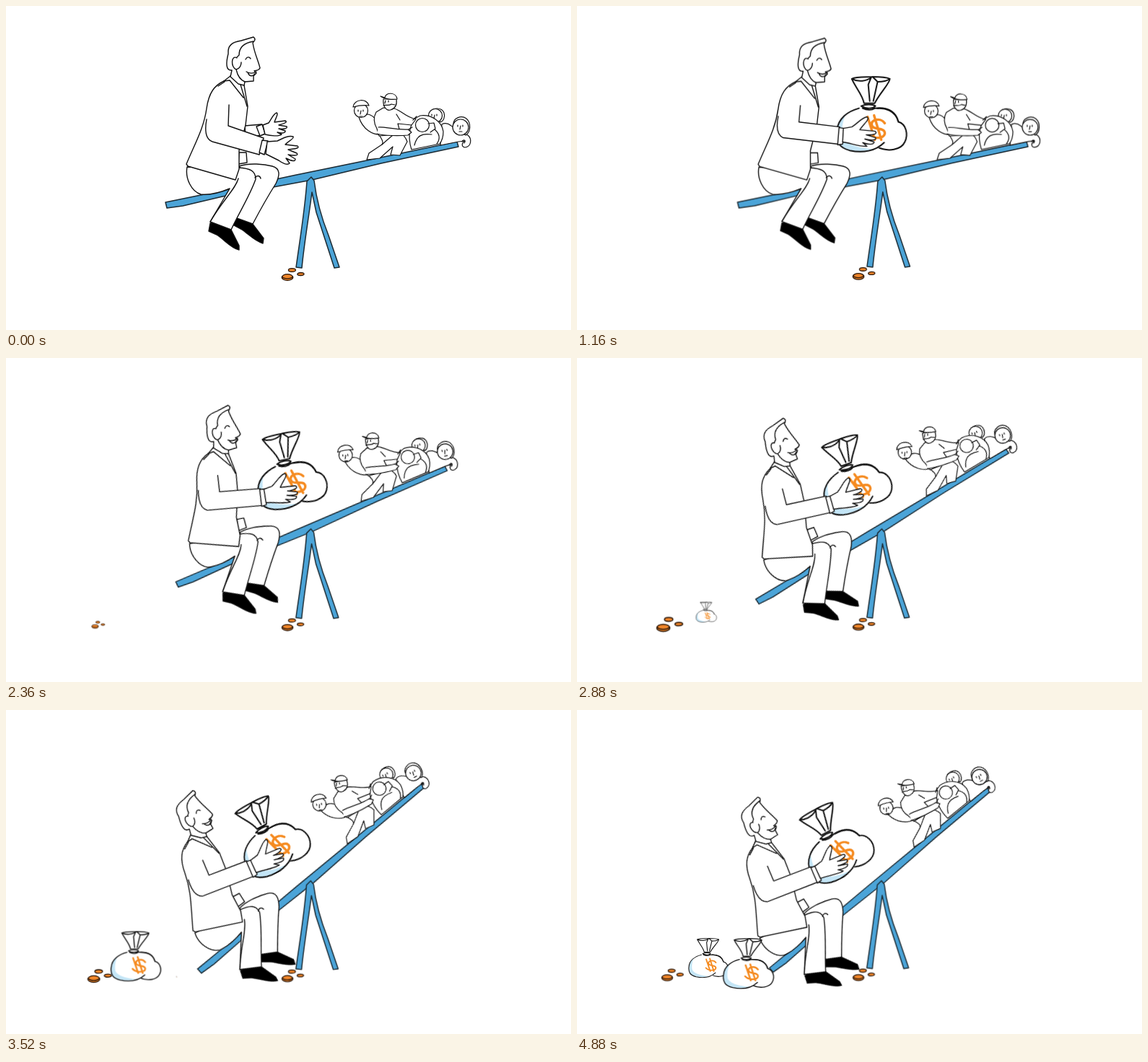
An HTML page without scripts that plays this animation: 783 by 449 pixels, repeating every 4.92 s.

```html
<!DOCTYPE html>
<html lang="en">
<head>
<meta charset="utf-8">
<title>Seesaw</title>
<style>
@property --lean { syntax: '<angle>'; inherits: true; initial-value: 0deg; }

:root { --loop: 4920ms linear infinite; }
html, body { margin: 0; width: 100%; height: 100%; overflow: hidden; background: #fff; }
svg { display: block; width: 100%; height: 100%; animation: lean var(--loop); }

.ink { fill: none; stroke: #111; stroke-width: 1.4; stroke-linecap: round; stroke-linejoin: round; }
.thin { stroke-width: 1.2; }
.bold { stroke-width: 2; }
.paper { fill: #fff; }
.black { fill: #000; }
.blue { fill: #4ba4d8; stroke: #1b2a33; stroke-width: 1.5; }
.coin { fill: #f0862a; stroke: #2a1608; stroke-width: 1.3; }
.shade { fill: #c3e5f6; stroke: none; }
.bare { stroke: none; }
.money { fill: none; stroke: #f58a1f; stroke-width: 3.4; }

.camera { transform-origin: 391.5px 224.5px; animation: camera var(--loop); }
.seesaw { transform-origin: 423px 234px; transform: rotate(calc(var(--lean) * -1)); }
.level { transform-box: fill-box; transform-origin: center; transform: rotate(calc(var(--lean) * .65)); }
.man { animation: man-slide var(--loop); }
.crew { animation: crew-slide var(--loop); }
.open { animation: open var(--loop); }
.hold { animation: hold var(--loop); }
.held { transform-origin: 400px 178px; animation: held var(--loop); }
.pop-coins { animation: pop-coins var(--loop); }
.pop-first { animation: pop-first var(--loop); }
.pop-second { animation: pop-second var(--loop); }

@keyframes camera { to { transform: scale(.9657); } }
@keyframes lean {
  0% { --lean: 0deg; }
  24.2% { --lean: .1deg; animation-timing-function: cubic-bezier(.4, 0, .75, .55); }
  34.6% { --lean: 2.8deg; }
  36.6% { --lean: 4.1deg; }
  45.9% { --lean: 10deg; }
  58.5% { --lean: 19.2deg; }
  67.1% { --lean: 25.8deg; animation-timing-function: ease-out; }
  71.5%, 100% { --lean: 27.9deg; }
}
@keyframes man-slide {
  0%, 46% { transform: none; }
  58.5% { transform: translate(-1px, .2px); }
  71.5% { transform: translate(-9.3px, 2px); }
  84.6% { transform: translate(-16.6px, 3.5px); }
  100% { transform: translate(-22.5px, 4.7px); }
}
@keyframes crew-slide {
  0%, 46% { transform: none; }
  58.5% { transform: translate(-3px, .6px); }
  71.5% { transform: translate(-7.8px, 1.6px); }
  84.6% { transform: translate(-11.2px, 2.4px); }
  100% { transform: translate(-14.7px, 3.1px); }
}
@keyframes open { 0%, 9.7% { opacity: 1; } 9.71%, 100% { opacity: 0; } }
@keyframes hold { 0%, 9.7% { opacity: 0; } 9.71%, 100% { opacity: 1; } }
@keyframes held { 0%, 6% { transform: scale(0); } 13%, 100% { transform: none; } }
@keyframes pop-coins {
  0%, 39% { transform: scale(0); }
  46.7% { transform: scale(.51); }
  52.4% { transform: scale(.9); }
  59.8% { transform: scale(1.25); }
  63.4% { transform: scale(1.3); }
  67.1% { transform: scale(1.22); }
  72.8% { transform: scale(1.05); }
  79.7%, 100% { transform: none; }
}
@keyframes pop-first {
  0%, 50.8% { transform: scale(0); }
  58.5% { transform: scale(.51); }
  64.2% { transform: scale(.9); }
  71.5% { transform: scale(1.25); }
  75.2% { transform: scale(1.32); }
  78.9% { transform: scale(1.25); }
  84.6% { transform: scale(1.05); }
  91.5%, 100% { transform: none; }
}
@keyframes pop-second {
  0%, 70.9% { transform: scale(0); }
  78.7% { transform: scale(.51); }
  84.4% { transform: scale(.9); }
  91.7% { transform: scale(1.25); }
  95.3% { transform: scale(1.32); }
  100% { transform: scale(1.27); }
}
</style>
</head>
<body>
<svg viewBox="0 0 783 449" preserveAspectRatio="none">
  <defs>
    <g id="coins" class="coin">
      <ellipse cx="-8.4" cy="4.2" rx="7.8" ry="4.3"/>
      <path d="M-16 3C-13 7-4 7-.8 3" fill="none"/>
      <ellipse cx="-2" cy="-5.8" rx="5" ry="2.3"/>
      <ellipse cx="10" cy="-.3" rx="4.6" ry="2"/>
    </g>
    <g id="bag" class="ink bold">
      <path class="paper" d="M412 142C428 139 442 145 446 160C457 163 460 178 455 188C450 199 432 203 416 195Z"/>
      <path class="paper bare" d="M397 141C378 144 362 154 360 173C357 190 366 198 390 202C408 203 424 196 430 186C442 166 440 146 412 141Z"/>
      <path class="shade" d="M372 150C360 158 357 182 364 193C374 201 394 203 410 198C392 197 372 192 368 180C366 168 369 158 372 150Z"/>
      <path d="M391 141C376 145 361 155 360 173C358 189 364 196 378 200C396 204 414 201 426 189M413 141C434 139 443 148 446 160"/>
      <path class="paper" d="M381 100C388 96 404 98 410 97C420 97 428 97 434 100C435 105 419 121 413 134L398 134C396 122 386 112 381 100Z"/>
      <path d="M381 100C390 105 402 103 408 98L404 108 406 131M411 98L417 104 411 131M417 104C424 104 430 103 434 100"/>
      <path class="paper" d="M394 138C400 135 410 135 414 138C410 142 400 142 394 138ZM396 141C402 144 409 144 413 141"/>
      <path class="money" d="M427 162C421 153 406 157 409 165C411 172 427 167 427 176C426 185 408 184 402 176M403 153L413 185M412 151L422 185"/>
    </g>
    <path id="face" d="M-4-2v2M3-2v2M0-1l-1 5M-2 7h4"/>
  </defs>

  <g class="camera">
    <g class="seesaw">
      <path class="ink blue" d="M221 272L309 254 400 234.500 500 214 625 188 627 195 520 218 424 241 300 264 245 277 223 280Z"/>

      <g class="crew ink thin">
        <!-- worker at the tip -->
        <path class="paper" d="M604 164C611 160 619 166 626 176L640 179C646 184 645 195 636 196C631 195 631 190 636 187L627 188 602 193Z"/>
        <path d="M632 188C634 184 638 186 635 190"/>
        <path class="paper" d="M620 165C619 155 631 151 638 156C645 162 644 175 637 179Z"/>
        <circle class="paper" cx="630" cy="168" r="11"/>
        <use href="#face" x="630" y="167"/>
        <!-- curled worker -->
        <path class="paper" d="M588 148C590 140 604 140 607 148C609 154 606 160 602 161Z"/>
        <circle class="paper" cx="595" cy="152" r="9.500"/>
        <use href="#face" x="594" y="152"/>
        <path class="paper" d="M562 199C556 180 559 157 574 152C590 150 604 160 606 174C606 182 604 187 601 191Z"/>
        <circle cx="577" cy="165" r="9.500"/>
        <path d="M566 193C569 180 576 176 590 178M585 163L593 162 595 170 588 175M594 171C601 177 602 184 597 191"/>
        <!-- worker hanging back -->
        <path class="paper" d="M500 150C508 150 513 157 519 167L522 178C508 180 494 170 489 154Z"/>
        <g class="level">
          <circle class="paper" cx="492" cy="145" r="9.500"/>
          <use href="#face" x="492" y="146"/>
          <path class="paper" d="M481 140C482 129 500 127 503 138C496 137 488 138 481 140Z"/>
        </g>
        <!-- bearded worker -->
        <path class="paper" d="M517 178C520 184 524 188 521 192L503 204 500 213 518 211 536 195 533 206 546 207 556 188C554 182 550 178 546 176Z"/>
        <path d="M521 192C526 188 532 182 535 180"/>
        <path class="paper" d="M523 141L513 147C508 156 510 163 514 170L517 180 547 178 543 163 562 165 568 157C554 154 548 145 538 142Z"/>
        <path class="paper" d="M516 168C525 167 540 172 557 171L562 175 557 179C545 180 525 180 514 177"/>
        <path d="M541 150L546 158M564 158L569 153M558 171L563 168"/>
        <g class="level">
          <path class="paper" d="M523 129C522 139 527 146 533 144C540 142 542 136 541 129Z"/>
          <path d="M523 138C526 136 530 139 534 136L539 137M530 131v2M526 131l-1 4"/>
          <path class="paper" d="M519 125L525 127C526 119 541 119 542 129C535 130 524 129 519 125Z"/>
        </g>
      </g>
    </g>

    <path class="ink blue" d="M417 243L423 237 427 242C431 275 439 298 447 318L462 362 455 363 430 286 424 258C420 290 413 330 410 363L402 362C407 325 414 285 417 243Z"/>

    <g class="seesaw">
      <g class="man ink">
        <!-- legs -->
        <path class="black" d="M318 293L341 301 357 322 356 329C345 326 336 316 327 310L314 303Z"/>
        <path class="paper" d="M323 222C337 217 358 219 369 222C380 225 380 234 374 246C362 265 352 283 342 302L317 293 335 240Z"/>
        <path class="black" d="M283 301L290 300 312 310 323 332 323 338C312 336 303 324 292 317L281 312Z"/>
        <path class="paper" d="M251 223C248 239 257 257 270 261C282 262 296 259 310 253L283 299 312 310C322 288 338 263 346 240C346 228 338 225 322 224Z"/>
        <path d="M322 239C318 254 301 268 283 299M345 238C348 234 352 235 353 239"/>
        <!-- far arm, empty hand -->
        <g class="open">
          <path class="paper" d="M331 166L354 164 357 178 332 184Z"/>
          <path class="paper" d="M347 167L355 164 359 177 352 180Z"/>
          <path class="paper" d="M356 165L364 162C368 156 371 149 375 148C378 149 373 157 372 161L387 159C391 161 385 163 378 165L389 167C391 170 384 171 378 170L387 173C388 176 382 177 376 175L382 178C378 181 367 180 359 178Z"/>
        </g>
        <!-- jacket -->
        <path class="paper" d="M323 203L333 203 334 217 322 219Z"/>
        <path class="paper" d="M311 97L302 104C289 110 281 120 278 142C274 170 262 190 250 219L252 222 318 241 323 226 323 200 332 165 335 139 330 110Z"/>
        <path d="M302 104L310 103 329 127M311 97L325 109 334 139M294 111L303 105"/>
        <!-- head -->
        <path class="paper" d="M311 98L313 89C304 90 305 78 308 66C307 55 313 50 326 48L343 43C347 46 344 49 342 51C344 65 349 74 352 86C350 90 346 89 344 90L347 93 343 97 343 104 331 105 330 110 322 108Z"/>
        <path d="M343 49C330 51 323 57 323 68L320 71M320 72C312 67 311 85 319 88C324 87 326 82 326 78M319 88C321 97 326 103 331 105M332 74C334 70 337 70 339 73M333 91C338 94 342 94 347 91M335 92C337 98 342 98 345 94"/>
        <!-- near arm, empty hand -->
        <g class="open">
          <path class="paper bare" d="M309 137L308 166 357 183 351 206 286 188C277 185 275 174 278 157Z"/>
          <path d="M309 137L308 166 357 183 351 206 286 188C277 185 275 174 278 157"/>
          <path class="paper" d="M355 186L363 187 358 206 351 203Z"/>
          <path class="paper" d="M362 188L376 187C384 183 392 179 398 181C400 184 391 187 387 192L404 194C408 197 400 198 391 199L403 204C406 207 400 208 391 206L401 212C401 216 396 215 388 211L393 218C390 221 383 218 378 214L360 205Z"/>
        </g>
        <use class="held" href="#bag"/>
        <!-- near arm around the sack -->
        <g class="hold">
          <path class="paper bare" d="M309 125L307 159 364 167 362 191 285 182C276 178 275 167 278 152Z"/>
          <path d="M309 137L307 160 364 167 362 191 285 182C276 178 275 167 278 152"/>
          <path class="paper" d="M363 168L370 169 368 191 361 192Z"/>
          <path class="paper" d="M369 169L381 167C389 162 395 154 402 153C407 156 398 162 392 171L413 173C418 176 412 179 401 178L414 182C416 186 408 186 399 184L412 188C412 192 404 192 396 189L402 194C394 195 380 190 368 188Z"/>
        </g>
      </g>
    </g>

    <use href="#coins" x="398.400" y="371.800"/>
    <g transform="translate(124 372)"><use class="pop-coins" href="#coins"/></g>
    <g transform="translate(175 362)"><g class="pop-first">
      <use href="#bag" transform="scale(.577 .535) translate(-409 -176)"/>
    </g></g>
    <g transform="translate(232.500 374)"><g class="pop-second">
      <use href="#bag" transform="scale(.577 .535) translate(-409 -176)"/>
    </g></g>
  </g>
</svg>
</body>
</html>
```
